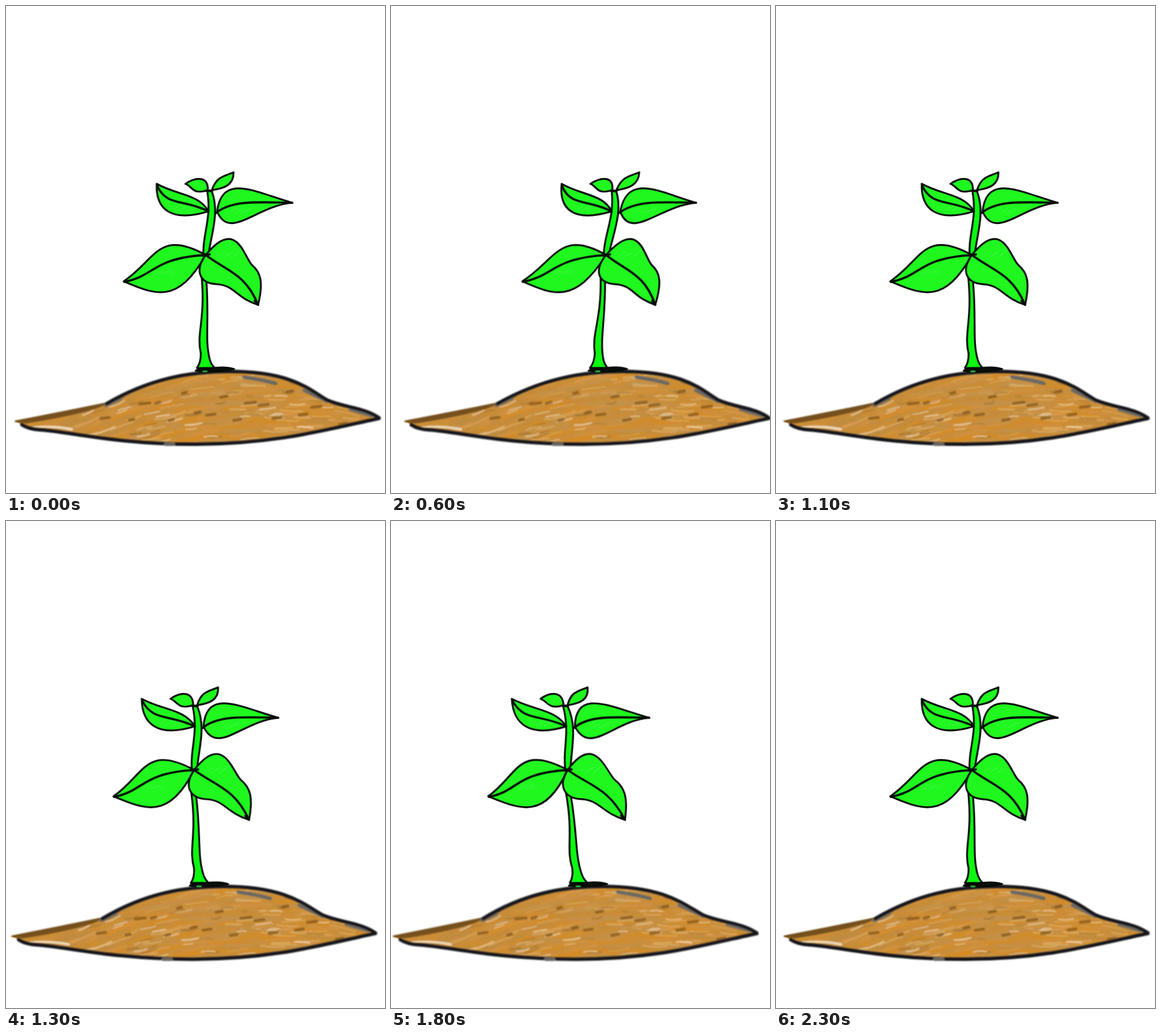
An HTML page that plays this animation: 660x849 px, repeating every 2.4 s.

```html
<!DOCTYPE html>
<html lang="en">
<head>
<meta charset="utf-8">
<title>Swaying seedling</title>
<style>
  html, body { margin: 0; width: 100%; height: 100%; overflow: hidden; background: #fff; }
  svg { display: block; width: 660px; height: 849px; }
  path { fill: none; stroke-linecap: round; stroke-linejoin: round; }
  #plant path { stroke: #060b06; stroke-width: 3.2; }
  #plant .rib { stroke-width: 3.8; }
  #plant .stem { fill: #0cf812; }
  #plant .leaf { fill: #1ff71f; }
  #plant .sheen { stroke: #58f858; stroke-width: 1.5; opacity: .4; }
  #rim path { stroke: #17191b; stroke-width: 6; }
  #rim .grey { stroke: #6b6763; }
  #rim .earth { stroke: #75501f; fill: #75501f; stroke-width: 3; }
</style>
</head>
<body>
<svg viewBox="0 0 660 849">
  <defs>
    <filter id="soft" x="-5%" y="-20%" width="110%" height="140%"><feGaussianBlur stdDeviation="0.8"/></filter>
    <clipPath id="inside">
      <path d="M17,724 L178,695 C250,650 320,637 390,637 C500,637 530,670 560,687 C590,700 625,700 651,718
               C560,738 470,765 330,765 S110,742 60,739 Q40,738 28,730Z"/>
    </clipPath>
  </defs>
  <g id="scene">
    <g clip-path="url(#inside)">
      <rect y="620" width="660" height="160" fill="#cb8d37"/>
      <g id="grain" filter="url(#soft)"></g>
    </g>
    <g id="rim" filter="url(#soft)">
      <path class="earth" d="M17,724 Q100,708 178,692 Q140,710 36,726Z"/>
      <path class="grey" d="M174,696 L200,684 M415,647 Q445,651 470,658 M520,670 L560,689 M600,703 L638,714"/>
      <path d="M176,693 C250,650 320,637 390,637 C500,637 530,670 560,687 C590,700 625,700 650,718"/>
      <path d="M650,719 C560,738 470,764 330,764 S110,742 60,739 Q40,738 28,730"/>
      <path class="grey" stroke-dasharray="14 999" d="M278,764 H300"/>
    </g>
    <g id="plant">
      <path class="stem" d="M342,474 C348,550 332,570 340,606 Q340,622 333,631 H364 Q357,624 355,614 C347,580 355,550 350,478Z"/>
      <path class="stem" d="M352,323 C360,370 343,400 345,433 H354 C358,400 374,360 360,323Z"/>
      <path class="leaf" d="M354,358 C338,328 300,330 264,310 C262,354 288,378 354,358Z"/>
      <path class="leaf" d="M369,358 C378,290 436,325 500,343 C438,348 390,410 369,358Z"/>
      <path class="leaf" d="M353,321 C354,296 332,298 314,310 C326,314 326,330 353,321Z"/>
      <path class="leaf" d="M360,321 C368,298 380,297 398,290 C398,312 382,318 360,321Z"/>
      <path class="leaf" d="M349,434 C266,388 262,443 206,480 C262,504 300,520 349,434Z"/>
      <path class="leaf" d="M349,434 C404,367 416,440 430,452 S450,480 440,521 C400,508 400,487 368,485 S330,460 349,434Z"/>
      <g id="sheen"></g>
      <path class="rib" d="M265,314 C282,350 310,336 354,358"/>
      <path class="rib" d="M367,361 C395,338 440,342 500,343"/>
      <path class="rib" d="M207,481 C262,470 255,440 349,434"/>
      <path class="rib" d="M349,434 C385,462 418,466 440,521"/>
      <path class="rib" d="M350,322 H361 M343,435 L356,433 M434,514 L440,520"/>
      <path style="fill:#0b100d" d="M331,636 Q338,630 350,633 Q380,627 398,633 Q365,639 331,636Z"/>
      <path style="stroke:#24a83c" d="M344,637 H350"/>
    </g>
  </g>
</svg>
<script>
const el = id => document.getElementById(id);

let seed = 41;
function rand(lo, hi) {
  seed = seed * 16807 % 2147483647;
  return lo + (hi - lo) * seed / 2147483647;
}

function stroke(parent, d, style) {
  const path = document.createElementNS('http://www.w3.org/2000/svg', 'path');
  path.setAttribute('d', d);
  path.style.cssText = style;
  parent.append(path);
  return path;
}

// Soil strokes rise on the left of the mound and fall on the right.
function scatter(count, colors, length, width, opacity, top = 640) {
  for (let i = 0; i < count; i++) {
    const x = rand(90, 625), y = rand(top, 762);
    const dx = rand(length / 4, length / 2);
    const dy = dx * (0.0011 * (x - 470) + rand(-0.12, 0.12));
    stroke(el('grain'), `M${x - dx},${y - dy} Q${x},${y + rand(-4, 4)} ${x + dx},${y + dy}`,
      `stroke:${colors[i % colors.length]};stroke-width:${rand(width / 2, width)};opacity:${opacity}`);
  }
}
scatter(220, ['#bc8a42', '#c98c36', '#d68a22', '#d09345', '#c0924f'], 75, 8, 0.6);
scatter(80, ['#dfb879', '#d9a75e'], 45, 3.5, 0.6);
scatter(30, ['#94682b', '#a8742c'], 32, 4, 0.5);
scatter(32, ['#f7ead3', '#f2ddbb'], 30, 2.5, 0.7, 680);

// Short dark flecks, evenly spread across the mound
for (let i = 0; i < 20; i++) {
  const x = 150 + i * 23, y = 700 + 24 * Math.sin(i * 2.4) + rand(-5, 5), w = rand(3, 9);
  stroke(el('grain'), `M${x - w},${y + 1} L${x + w},${y - 1}`, 'stroke:#86591b;stroke-width:5;opacity:.8');
}
stroke(el('grain'), 'M48,735 Q80,731 115,738', 'stroke:#f8efdf;stroke-width:4;opacity:.8');

// Faint marker sheen on the four big leaves
for (const [x, y] of [[295, 350], [395, 352], [258, 462], [372, 430]]) {
  for (let i = 0; i < 5; i++) {
    stroke(el('sheen'), `M${x + i * 7},${y + rand(4, 10)} l${rand(9, 14)},${-rand(5, 9)}`, '').setAttribute('class', 'sheen');
  }
}

// The scene shears about the ground line in a steady to-and-fro.
const LOOP = 2400, STEP = 100, PEAK = 500, GROUND = 849;
const MIDDLE = -0.019, SWING = 0.0966;
const start = performance.now();

function frame() {
  const t = Math.floor((performance.now() - start) % LOOP / STEP) * STEP;
  const away = Math.abs((t - PEAK + LOOP * 1.5) % LOOP - LOOP / 2);
  const lean = MIDDLE + SWING * (1 - 4 * away / LOOP);
  el('scene').setAttribute('transform', `matrix(1 0 ${-lean} 1 ${lean * GROUND} 0)`);
  requestAnimationFrame(frame);
}
frame();
</script>
</body>
</html>
```
